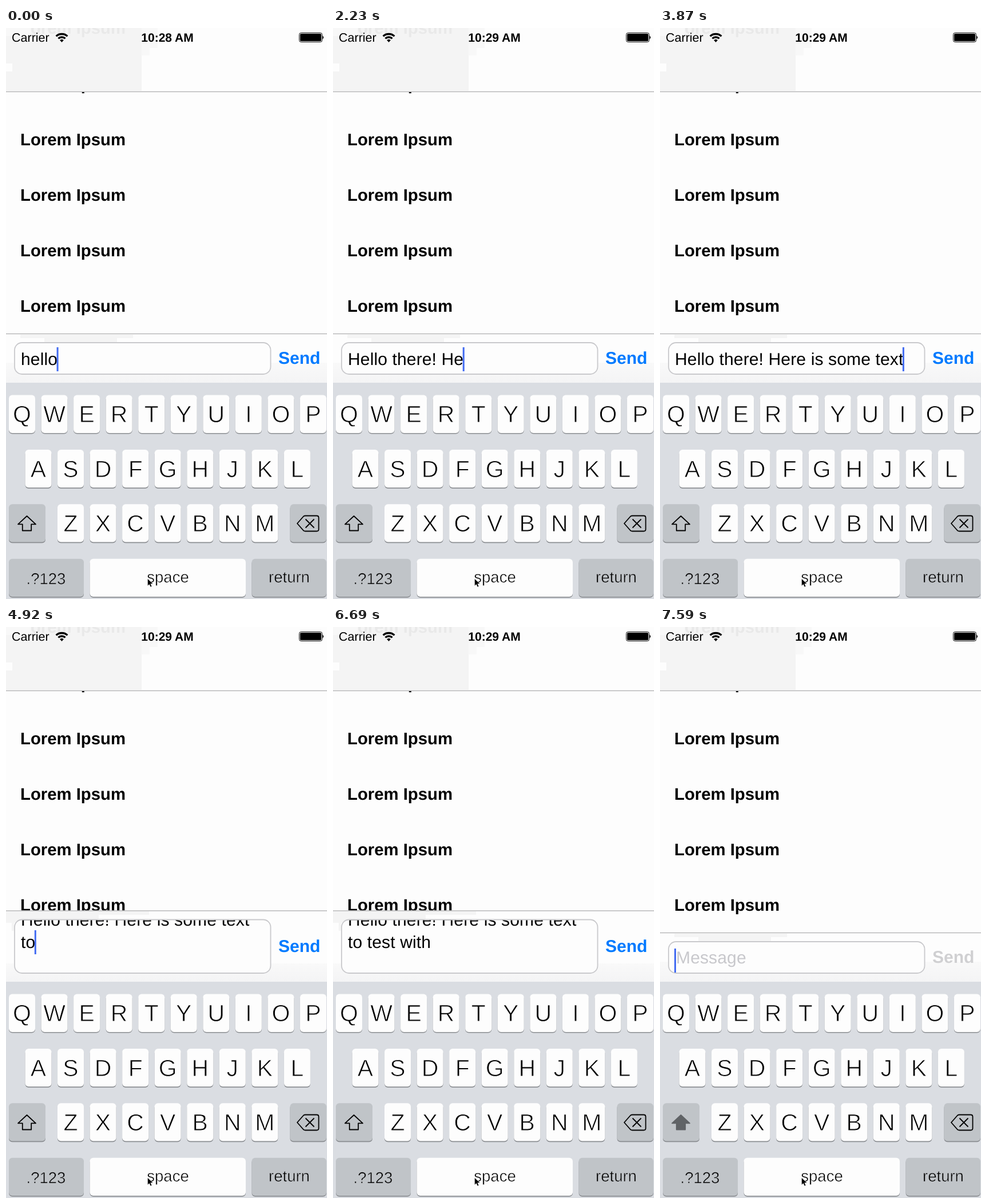
Recreate the animation shown at these times as an HTML page. Size 561 by 998 pixels, loop 8 s.

```html
<!DOCTYPE html>
<html lang="en">
<head>
<meta charset="utf-8">
<title>Message composer</title>
<style>
  html, body { margin: 0; width: 100%; height: 100%; overflow: hidden; background: #fdfdfd; }
  svg { display: block; width: 100%; height: 100%; }
  text { font-family: "Liberation Sans", Arial, sans-serif; white-space: pre; text-rendering: geometricPrecision; }
  .body { font-size: 30px; letter-spacing: .14px; }
  .row { font-size: 29.3px; font-weight: bold; }
  .key { font-size: 41px; text-anchor: middle; stroke: #fdfdfd; stroke-width: 1px; }
  .word { font-size: 27.5px; text-anchor: middle; stroke-width: .6px; }
  .send { font-size: 30px; font-weight: bold; }
</style>
</head>
<body>
<svg id="stage" viewBox="0 0 561 998" preserveAspectRatio="none">
  <defs>
    <clipPath id="listClip"><rect y="112" width="561" height="500"/></clipPath>
    <clipPath id="fieldClip"><rect id="clipBox" x="16" width="446"/></clipPath>
    <linearGradient id="fade" x2="0" y2="1">
      <stop stop-color="#f9f9f9"/><stop offset="1" stop-color="#f4f4f5"/>
    </linearGradient>
  </defs>

  <rect width="561" height="998" fill="#fdfdfd"/>
  <g id="rows" clip-path="url(#listClip)"></g>

  <g id="header">
    <path d="M0 0H237V110H0V76H11V62H0Z" fill="#f4f4f4"/>
    <path d="M237 0H265V35H251V48H237Z" fill="#f8f8f8"/>
    <text class="row" x="25" y="10" fill="#e9e9e9">Lorem Ipsum</text>
    <rect width="43" height="14" fill="#f8f8f8"/>
    <rect y="110.7" width="561" height="1.4" fill="#b4b4b5"/>
    <text x="10" y="24" font-size="21.5">Carrier</text>
    <g fill="none" stroke="#000" stroke-width="3.3">
      <path d="M87.6 14.4A14.5 14.5 0 0 1 107.4 14.4"/>
      <path d="M91.4 18.4A9 9 0 0 1 103.6 18.4"/>
    </g>
    <path d="M94.1 21.3A5 5 0 0 1 100.9 21.3L97.5 25Z"/>
    <text id="clock" x="282" y="24" font-size="21" font-weight="bold" text-anchor="middle"></text>
    <rect x="512.5" y="8.5" width="40" height="16" rx="3" fill="none" stroke="#000"/>
    <rect x="514" y="10" width="37" height="13" rx="1.5"/>
    <path d="M553.5 13.5Q557 16.5 553.5 19.5Z"/>
  </g>

  <g id="bar">
    <rect id="barBack" width="561" fill="#fdfdfd"/>
    <path id="barPatch" fill="#f4f4f4"/>
    <rect id="barFoot" width="561" fill="url(#fade)"/>
    <rect id="barLine" width="561" height="1.4" fill="#b4b4b5"/>
    <rect id="field" x="15" width="447.5" rx="13" fill="#fdfdfd" stroke="#c9c9cc" stroke-width="1.8"/>
    <g clip-path="url(#fieldClip)">
      <g id="select" fill="#ccdcee">
        <rect x="27" y="512" width="424" height="20"/>
        <rect x="27" y="530" width="149" height="41"/>
      </g>
      <text id="line1" class="body" x="26"></text>
      <text id="line2" class="body" x="26"></text>
      <text id="hint" class="body" x="28" fill="#c8c8cc">Message</text>
      <rect id="caret" width="3" height="42" fill="#426bf2"/>
    </g>
    <g id="handles" fill="#426bf2">
      <rect x="24.5" y="508" width="3" height="24"/><circle cx="26" cy="500" r="8.5"/>
      <rect x="175" y="530" width="3" height="42"/><circle cx="176.5" cy="579" r="8.5"/>
    </g>
    <text id="send" class="send" x="476">Send</text>
  </g>

  <g id="keys"><rect y="620" width="561" height="378" fill="#dadde2"/></g>
  <path id="shift" d="M36.5 853L52 867.3H44.2V878.5H28.8V867.3H21Z" stroke-width="1.8" stroke-linejoin="round"/>
  <g fill="none" stroke="#000" stroke-width="1.8" stroke-linejoin="round">
    <path d="M509 866L520 853.5Q521.5 852.5 523 852.5H543Q546.5 852.5 546.5 856V876Q546.5 879.5 543 879.5H523Q521.5 879.5 520 878.5Z"/>
    <path d="M523.5 858.5L538.5 873.5M538.5 858.5L523.5 873.5"/>
  </g>
  <path id="pointer" d="M247.5 962.5V975L250.4 972.4L252.6 977L254.8 976L252.8 971.6H257Z" stroke="#fff" stroke-width=".5"/>
</svg>

<script>
const LOOP = 8000, CLOCK_AT = 450;
const $ = id => document.getElementById(id);
const set = (el, attrs) => {
  for (const name in attrs) el.setAttribute(name, attrs[name]);
  return el;
};
const add = (parent, tag, attrs, label) => {
  const el = set(document.createElementNS('http://www.w3.org/2000/svg', tag), attrs);
  if (label) el.textContent = label;
  return parent.appendChild(el);
};
const show = (id, on) => set($(id), { visibility: on ? 'visible' : 'hidden' });

for (let i = 0; i < 5; i++)
  add($('rows'), 'text', { class: 'row', x: 25, y: 108.3 + i * 97 }, 'Lorem Ipsum');

function drawKey(x, y, w, fill) {
  add($('keys'), 'rect', { x, y: y + 2, width: w, height: 66, rx: 6, fill: '#8b8e92' });
  add($('keys'), 'rect', { x, y, width: w, height: 66.3, rx: 6, fill });
}
const WHITE = '#fdfdfd', GRAY = '#c0c4c8';
[['QWERTYUIOP', 5, 641.6], ['ASDFGHJKL', 33.5, 737], ['ZXCVBNM', 90, 832.3]].forEach(([letters, x0, y]) => {
  [...letters].forEach((letter, i) => {
    const x = x0 + i * 56.55;
    drawKey(x, y, 46, WHITE);
    add($('keys'), 'text', { class: 'key', x: x + 23, y: y + 47.6 }, letter);
  });
});
drawKey(5, 832.3, 64, GRAY);
drawKey(496.5, 832.3, 63.5, GRAY);
[[5, 131, GRAY, '.?123', 972, 70], [146.5, 272.5, WHITE, 'space', 969, 283], [429.5, 130.5, GRAY, 'return', 969, 495]]
  .forEach(([x, w, fill, label, y, mid]) => {
    drawKey(x, 927.7, w, fill);
    add($('keys'), 'text', { class: 'word', x: mid, y, stroke: fill }, label);
  });

// Each step: start time, first line, and what differs from the defaults.
const opening = 'Hello there! ', first = opening + 'Here is some text';
const typed = (time, tail) => [time, opening + tail];
const wrapped = (time, second, more) => [time, first, { second, grow: 1, ...more }];
const steps = [
  [0, 'hello'],
  [150, 'Hello '],
  [300, 'Hello t'],
  [450, 'Hello th'],
  [590, 'Hello the'],
  [740, 'Hello there'],
  [1330, 'Hello there', { caret: .12 }],
  [1480, 'Hello there!'],
  [1780, opening, { caps: true }],
  typed(2080, 'H'),
  typed(2230, 'He'),
  typed(2380, 'Here'),
  typed(2530, 'Here i'),
  typed(2680, 'Here is '),
  typed(2980, 'Here is som'),
  typed(3130, 'Here is some'),
  typed(3280, 'Here is some '),
  typed(3430, 'Here is some t'),
  typed(3570, 'Here is some te'),
  typed(3720, 'Here is some tex'),
  typed(3870, 'Here is some text'),
  typed(4470, 'Here is some text '),
  typed(4620, 'Here is some text t'),
  wrapped(4770, 'to', { grow: .5 }),
  wrapped(4920, 'to'),
  wrapped(5060, 'to '),
  wrapped(5210, 'to t'),
  wrapped(5360, 'to te'),
  wrapped(5510, 'to test'),
  wrapped(5660, 'to test w'),
  wrapped(5800, 'to test wi'),
  wrapped(5950, 'to test with'),
  wrapped(6550, 'to test with', { caret: .12 }),
  wrapped(6690, 'to test with', { caret: 0 }),
  wrapped(6990, 'to test with', { caret: 0, selected: true }),
  [7140, '', { grow: 1, caps: true }],
  [7590, '', { caps: true, disabled: true }]
];

const ruler = document.createElement('canvas').getContext('2d');
ruler.font = '30px "Liberation Sans", Arial, sans-serif';
const widthOf = s => ruler.measureText(s).width + s.length * .14;

function render([, line, opts = {}]) {
  const { second = '', grow = 0, caret = 1, caps = false, selected = false, disabled = false } = opts;
  const rise = 38.5 * grow, top = 550 - rise, empty = !line;
  const base = 588.7 - rise + (grow ? 10.8 : 0);

  set($('barBack'), { y: 534 - rise, height: 86 + rise });
  set($('barLine'), { y: 533.8 - rise });
  set($('barFoot'), { y: grow ? 588 : 585, height: grow ? 32 : 35 });
  set($('barPatch'), { d: grow === 1
    ? 'M0 497H250V503H162V510H38V517H14V531H10V517H0Z'
    : grow ? '' : 'M25 536H222V542H194V549H67V542H25Z' });
  set($('field'), { y: top, height: 605 - top });
  set($('clipBox'), { y: top + 1, height: 603 - top });

  $('line1').textContent = line;
  $('line2').textContent = second;
  set($('line1'), { y: second ? base - 38.7 : 588.7 - rise });
  set($('line2'), { y: base });
  set($('hint'), { y: 588 - rise });
  show('hint', empty);

  const edge = empty ? 26.5 : 26 + widthOf(second || line);
  const caretY = empty ? 562 - rise : second ? base - 31 : 558;
  set($('caret'), { x: edge - 1.5, y: caretY, opacity: caret });
  show('select', selected);
  show('handles', selected);
  set($('send'), { y: 587 - rise / 2, fill: disabled ? '#d0d0d2' : '#007aff' });
  set($('shift'), caps ? { fill: '#606366', stroke: '#606366' } : { fill: 'none', stroke: '#000' });
}

let shown;
function tick() {
  const time = performance.now() % LOOP;
  const step = steps.findLast(s => s[0] <= time);
  $('clock').textContent = time < CLOCK_AT ? '10:28 AM' : '10:29 AM';
  if (step !== shown) render(shown = step);
  requestAnimationFrame(tick);
}
tick();
</script>
</body>
</html>
```
